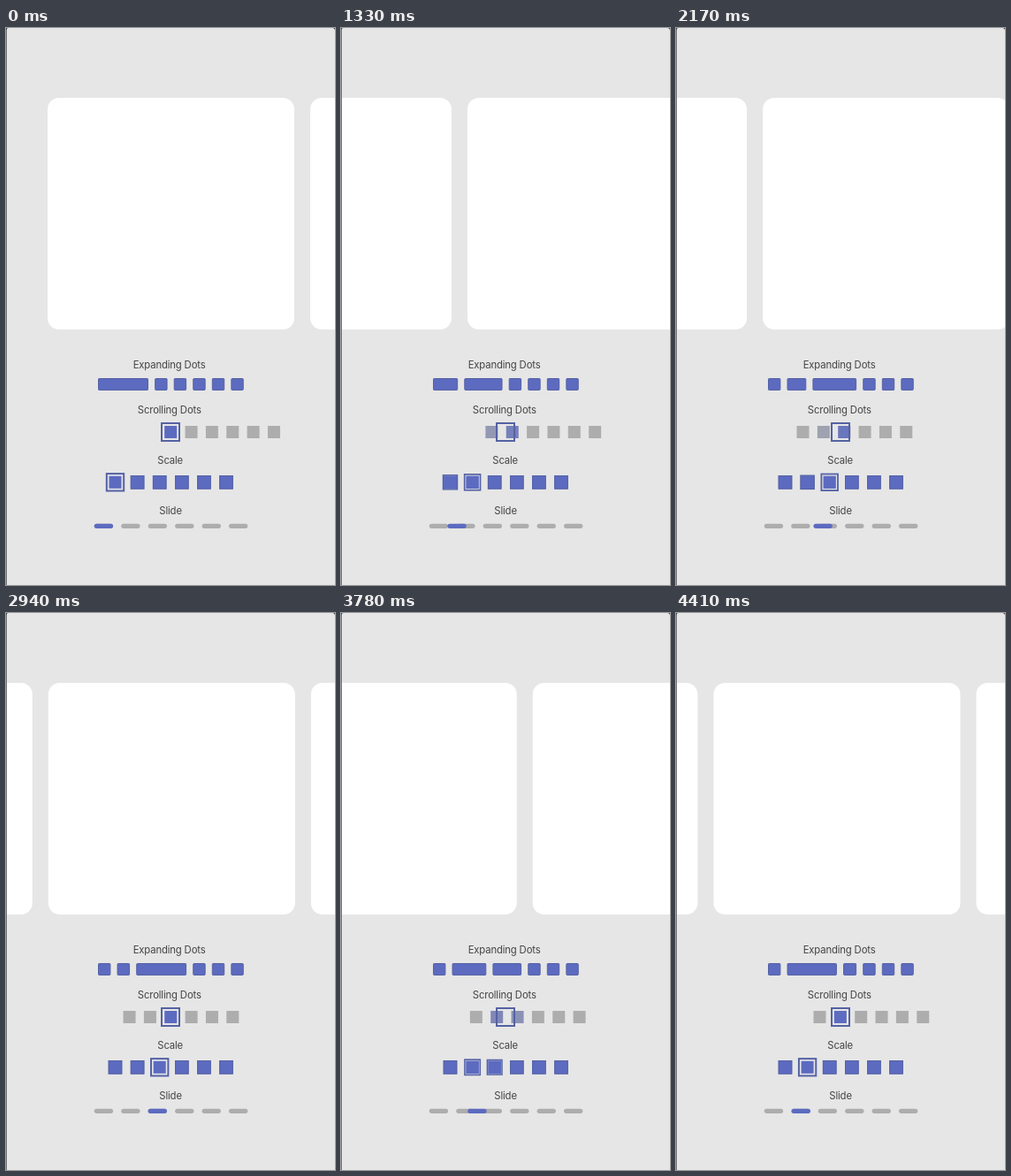
These frames come from a looping animation (372 px wide and 630 px high, 4.48 s). An HTML page:

```html
<!DOCTYPE html>
<html lang="en">
<head>
<meta charset="utf-8">
<title>Carousel indicators</title>
<style>
  html, body { margin: 0; width: 100%; height: 100%; overflow: hidden; background: #e6e6e6; }
  svg { display: block; }
  text { font: 400 11.3px Inter, Roboto, sans-serif; letter-spacing: -0.15px; fill: #444; text-anchor: middle; }
</style>
</head>
<body>
<svg id="stage" width="372" height="630" viewBox="0 0 372 630"></svg>
<script>
const LOOP = 4480, STEP = 70, COUNT = 6;
const BLUE = '#5c6bc0', EDGE = '#5562a3', GREY = '#adadad';
const stage = document.getElementById('stage');

// Each swipe adds its distance in pages to the carousel position
const swipes = [
  { start: 840, time: 980, pages: 1 },
  { start: 1750, time: 673, pages: 1 },
  { start: 2930, time: 640, pages: -.555 },
  { start: 3730, time: 840, pages: -.445 }
];

// Quick pull, long settle
const ease = u => 1 - (1 - u ** 1.5) ** 2.59;
const clamp = u => Math.min(1, Math.max(0, u));
const pageAt = t => swipes.reduce((p, s) => p + s.pages * ease(clamp((t - s.start) / s.time)), 0);

function set(el, attrs) {
  for (const name in attrs) el.setAttribute(name, attrs[name]);
  return el;
}

function add(tag, attrs) {
  return stage.appendChild(set(document.createElementNS('http://www.w3.org/2000/svg', tag), attrs));
}

const rect = (x, y, width, height, attrs) => add('rect', { x, y, width, height, ...attrs });
const row = (n, make) => Array.from({ length: n }, (_, i) => make(i));

function square(el, cx, cy, size) {
  return set(el, { x: cx - size / 2, y: cy - size / 2, width: size, height: size });
}

function mix(a) {
  const from = [173, 173, 173], to = [92, 107, 192];
  return `rgb(${from.map((v, i) => Math.round(v + (to[i] - v) * a))})`;
}

const cards = row(4, () => rect(0, 79, 279, 262, { rx: 13, fill: '#fff' }));

[['Expanding Dots', 184.6, 385], ['Scrolling Dots', 184.8, 436],
 ['Scale', 185.7, 493], ['Slide', 186.1, 550]].forEach(([label, x, y]) => {
  add('text', { x, y }).textContent = label;
});

const bars = row(COUNT, () => rect(0, 396.5, 14, 13, { rx: .8, fill: BLUE, stroke: EDGE }));
const dots = row(COUNT, () => add('rect', {}));
square(add('rect', { fill: 'none', stroke: EDGE, 'stroke-width': 2 }), 186, 457, 20);
const scales = row(COUNT, () => ({
  back: add('rect', { fill: '#e4e5ec' }),
  core: add('rect', { fill: BLUE }),
  ring: add('rect', { fill: 'none', stroke: EDGE })
}));

const dash = (i, fill) => rect(99.8 + i * 30.45, 560.7, 21.3, 5.3, { rx: 2.65, fill });
row(COUNT, i => dash(i, GREY));
const slider = dash(0, BLUE);

// Window edge and corners
rect(0, 0, 1, 630, { fill: '#707070' });
add('path', { d: 'M0 0h3Q0 0 0 3zM372 0h-3Q372 0 372 3z', fill: '#333' });

function draw(p) {
  cards.forEach((el, i) => set(el, { x: 47 + 297 * (i - p) }));
  let x = 104;
  for (let i = 0; i < COUNT; i++) {
    const on = Math.max(0, 1 - Math.abs(i - p));

    const width = 14.4 + 42.6 * on;
    set(bars[i], { x: x + .5, width: width - 1 });
    x += width + 7.15;

    set(square(dots[i], 186.2 + 23.35 * (i - p), 457, 14), { fill: mix(on) });

    const cx = 123.5 + 25.1 * i, cy = 513.8, line = 1 + on;
    const size = 15.6 + 5.8 * on - line;
    const { back, core, ring } = scales[i];
    square(back, cx, cy, size);
    square(core, cx, cy, 15.6 - 1.6 * on);
    set(square(ring, cx, cy, size), { 'stroke-width': line });
  }
  set(slider, { x: 99.8 + 30.45 * p });
}

const start = performance.now();
function tick() {
  const t = (performance.now() - start) % LOOP;
  draw(pageAt(Math.floor(t / STEP) * STEP));
  requestAnimationFrame(tick);
}
tick();
</script>
</body>
</html>
```
